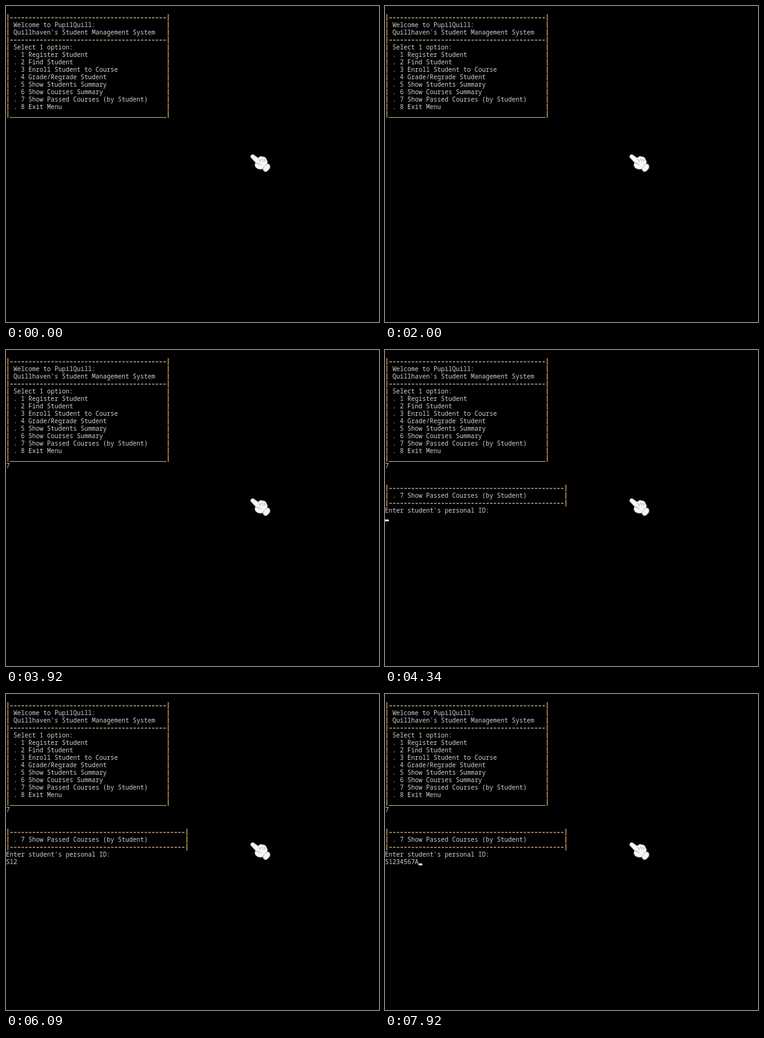
Write an HTML page that moves like this. It is 600 px wide and 509 px high and loops after 8 s.

```html
<!DOCTYPE html>
<html lang="en">
<head>
<meta charset="utf-8">
<title>Student console</title>
<style>
  html, body { margin: 0; width: 100%; height: 100%; overflow: hidden; background: #000; }
  svg { display: block; width: 100%; height: 100%; }
  text { font: 500 10px "Noto Sans Mono", "DejaVu Sans Mono", monospace; fill: #d0d0d0; white-space: pre; }
  .rule { stroke: #b89c78; stroke-width: 1.4; stroke-dasharray: 4 2; }
  .pipe { stroke: #c08a50; stroke-width: 1.6; }
  .base { stroke: #bfb6a8; stroke-width: 1.2; }
</style>
</head>
<body>
<svg id="stage" viewBox="0 0 600 509">
  <rect width="600" height="509" fill="#000"/>
  <g id="menu"></g>
  <text id="choice" x="0" y="190"></text>
  <g id="panel"></g>
  <text id="entry" x="0" y="274"></text>
  <rect id="caret" width="6" height="3" fill="#f4f4f4"/>
  <g stroke="#999" stroke-width=".8" stroke-linejoin="round" fill="#f6f6f6">
    <path d="M393.800 244C392.500 241 395 238.400 398 239.400L406 245C407.500 242 411 241.300 413 242.900C416 242.500 418.500 244.800 419 247.300C421 250 420.800 252.800 419.800 255.200L414 262.300C409.500 264 404 262.800 401.500 259.500C399.800 257 400 254.800 401.500 252.300Z"/>
    <path d="M413.300 263C412.800 260 419.500 253.300 421.800 254.300C425.200 255.300 425.700 259.500 423.700 262.300C421.500 265.500 418.500 267.800 416.300 266.700C414.600 265.900 413.700 264.500 413.300 263Z"/>
    <path d="M407 246.800L409 251M411 246L413.500 250.500M415 246.500L416.700 250M402.500 253.500C405.500 252.300 407.500 254 408.500 256.500" fill="none" stroke="#777"/>
  </g>
</svg>
<script>
const LOOP = 8000, CELL = 6, ROW = 12;
const BLINK = 530, BLINK_START = 85;
const CHOICE_AT = 3700, PANEL_AT = 4020;
const ID = "S1234567A";
const KEY_TIMES = [5500, 5750, 6000, 6300, 6560, 6820, 7080, 7340, 7600];
const $ = id => document.getElementById(id);

const label = (row, col, str) =>
  `<text x="${col * CELL}" y="${row * ROW + 10}">${str}</text>`;

const pipe = (row, col) =>
  `<path class="pipe" d="M${col * CELL + 3} ${row * ROW + 1}v11"/>`;

const rule = (row, width) =>
  `<path class="rule" d="M7 ${row * ROW + 7}H${(width + 1) * CELL}"/>`;

// A null line is a dashed rule.
function box(top, width, lines) {
  return lines.map((line, i) => {
    const row = top + i;
    const body = line === null ? rule(row, width) : label(row, 2, line);
    return pipe(row, 0) + body + pipe(row, width + 1);
  }).join("");
}

const options = [
  "Register Student", "Find Student", "Enroll Student to Course",
  "Grade/Regrade Student", "Show Students Summary", "Show Courses Summary",
  "Show Passed Courses (by Student)", "Exit Menu"
].map((name, i) => `. ${i + 1} ${name}`);

$("menu").innerHTML = box(1, 42, [
  null, "Welcome to PupilQuill:", "Quillhaven's Student Management System",
  null, "Select 1 option:", ...options, ""
]) + '<path class="base" d="M6 179.500H258"/>';

$("panel").innerHTML = box(18, 47, [null, options[6], null])
  + label(21, 0, "Enter student's personal ID:");

function render(t) {
  const chosen = t >= CHOICE_AT, open = t >= PANEL_AT;
  const typed = KEY_TIMES.filter(at => t >= at).length;
  const phase = (t - BLINK_START + 2 * BLINK) % (2 * BLINK);
  const col = open ? typed : +chosen;
  $("choice").textContent = chosen ? "7" : "";
  $("panel").style.display = open ? "" : "none";
  $("entry").textContent = ID.slice(0, typed);
  $("caret").setAttribute("x", col * CELL);
  $("caret").setAttribute("y", (open ? 22 : 15) * ROW + 9);
  $("caret").style.display = phase < BLINK ? "" : "none";
}

const start = performance.now();
function tick() {
  render((performance.now() - start) % LOOP);
  requestAnimationFrame(tick);
}
tick();
</script>
</body>
</html>
```
